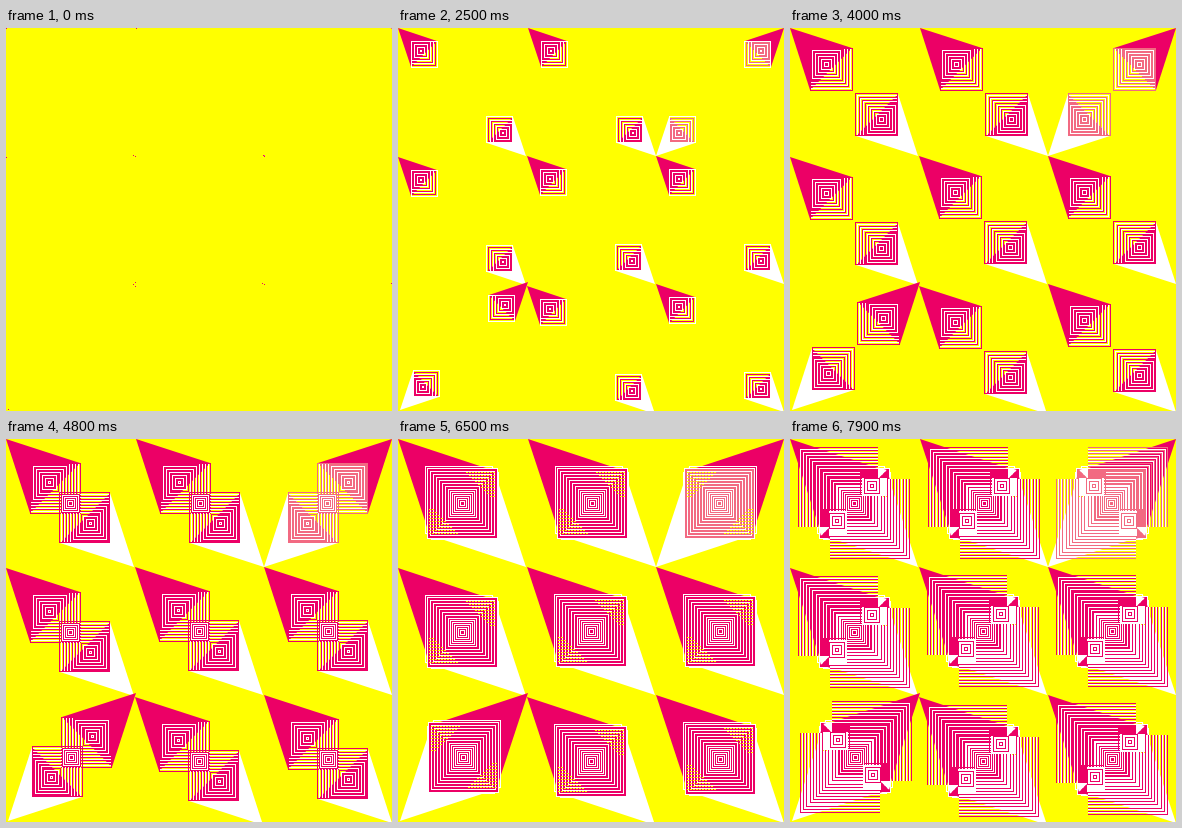
Recreate the animation shown at these times as an HTML page with a canvas. Size 386x383 px, loop 8000 ms.

```html
<!DOCTYPE html>
<html>
<head>
<meta charset="utf-8">
<style>
html, body { margin: 0; width: 100%; height: 100%; overflow: hidden; background: #ff0; }
canvas { display: block; }
</style>
</head>
<body>
<canvas id="stage" width="386" height="383"></canvas>
<script>
const ctx = document.getElementById('stage').getContext('2d');
const PINK = '#ec0066', WHITE = '#fff', YELLOW = '#ff0', SOFT = '#f26a82';
const SIZE = 128, MEET = 65, NEAR = 0.5, FAR = 1.53;

// x, y, horizontal direction, line colour
const tiles = [
  [0, 0, 1, PINK], [130, 0, 1, PINK], [386, 0, -1, SOFT],
  [0, 129, 1, PINK], [129, 128, 1, PINK], [258, 128, 1, PINK],
  [130, 254, -1, PINK], [129, 258, 1, PINK], [258, 256, 1, PINK]
];

function poly(color, ...pts) {
  ctx.fillStyle = color;
  ctx.beginPath();
  for (let i = 0; i < pts.length; i += 2) ctx.lineTo(pts[i], pts[i + 1]);
  ctx.fill();
}

function rect(color, x, y, w, h) {
  ctx.fillStyle = color;
  ctx.fillRect(x, y, w, h);
}

function ring(color, a, b, c, d) {
  const w = c - a + 1, h = d - b + 1;
  rect(color, a, b, w, 1);
  rect(color, a, d, w, 1);
  rect(color, a, b, 1, h);
  rect(color, c, b, 1, h);
}

// Top and left edge of a square
function angle(color, a, b, width) {
  rect(color, a, a, b - a, width);
  rect(color, a, a, width, b - a);
}

function clipBox(x, y, w, h, draw) {
  ctx.save();
  ctx.beginPath();
  ctx.rect(x, y, w, h);
  ctx.clip();
  draw();
  ctx.restore();
}

function within(matrix, draw) {
  ctx.save();
  ctx.transform(...matrix);
  draw();
  ctx.restore();
}

const turned = draw => within([-1, 0, 0, -1, SIZE, SIZE], draw);
const flipped = draw => within([0, 1, 1, 0, 0, 0], draw);
const shade = (m, ink) => m % 2 ? WHITE : ink;

function kite(n, fill, ink) {
  const a = Math.round(NEAR * n), b = Math.round(FAR * n + 0.4);
  poly(fill, 0, 0, b, a, a, b);
  poly(ink, a, a, b, a, a, b);
  clipBox(a, a, b - a + 1, b - a + 1, () => {
    for (let m = Math.ceil(0.59 * n); m < n; m++) {
      const lo = Math.round(1.8 * n - FAR * m), hi = Math.round(FAR * m);
      ring(shade(m, ink), lo, lo, hi, hi);
    }
  });
  ring(shade(n, ink), a, a, b, b);
}

function overlap(n, ink) {
  const hi = Math.round(FAR * n), lo = SIZE - hi;
  if (hi <= lo) return;
  rect(ink, lo, lo, hi - lo, hi - lo);
  for (let m = 42; m <= n; m++) {
    const q = Math.round(FAR * m);
    ring(shade(m, ink), SIZE - q, SIZE - q, q, q);
  }
  for (let r = Math.min(12, hi - 64); r > 0; r--)
    ring(shade(r + 1, ink), 64 - r, 64 - r, 64 + r, 64 + r);
  if (n < 57) return;
  const dots = () => {
    for (let y = lo + 4; y < lo + 30; y += 3)
      for (let x = 64 + (y - lo); x < hi - 2; x += 3) rect(YELLOW, x, y, 2, 1);
  };
  dots();
  turned(dots);
}

const nearEdge = j => Math.round(30.4 - 1.6 * j);
const farEdge = j => Math.round(97.3 - 0.65 * j);

// Stripes that spread out and in once the squares have met
function spread(j, fill, ink) {
  const end = farEdge(j);
  for (let k = 1; k <= j; k++) {
    angle(shade(k, ink), nearEdge(k), end, 1);
    const p = Math.round(30 + 1.6 * k), light = fill === WHITE;
    if (k % 2) angle(light ? WHITE : ink, p, SIZE - p, 2);
    else angle(light ? ink : WHITE, p, SIZE - p, 1);
  }
}

// Small square and kites growing from a side corner
function side(j, ink) {
  const x = 97, y = 31, r = farEdge(j), t = SIZE - r;
  const a = Math.round(0.55 * (j + 1)), b = Math.round(FAR * (j + 1));
  const l = x - b, v = y + a, s = b - a;
  poly(WHITE, x, y, r, r / 3 - 1, r, t);
  poly(ink, x, y, r, t, SIZE + 1 - r / 3, t);
  rect(ink, l - 4, y, Math.max(0, r - l + 4), a);
  rect(ink, l - 4, y, 1, b + 2);
  rect(WHITE, l - 2, v, b + 2, s + 3);
  for (let k = 0; k < s / 2; k += 3)
    ring(ink, l + k, v + k, l + s - k, v + s - k);
}

function tile(n, ink) {
  const s = Math.min(n, MEET), j = n - MEET;
  kite(s, PINK, ink);
  turned(() => kite(s, WHITE, ink));
  overlap(s, ink);
  if (j <= 0) return;
  spread(j, PINK, ink);
  turned(() => spread(j, WHITE, ink));
  side(j, ink);
  flipped(() => side(j, ink));
}

function frame() {
  const n = Math.floor(performance.now() % 8000 / 100);
  ctx.setTransform(1, 0, 0, 1, 0, 0);
  rect(YELLOW, 0, 0, 386, 383);
  for (const [x, y, dir, ink] of tiles) {
    ctx.setTransform(dir, 0, 0, 1, x, y);
    tile(n, ink);
  }
  requestAnimationFrame(frame);
}
frame();
</script>
</body>
</html>
```
